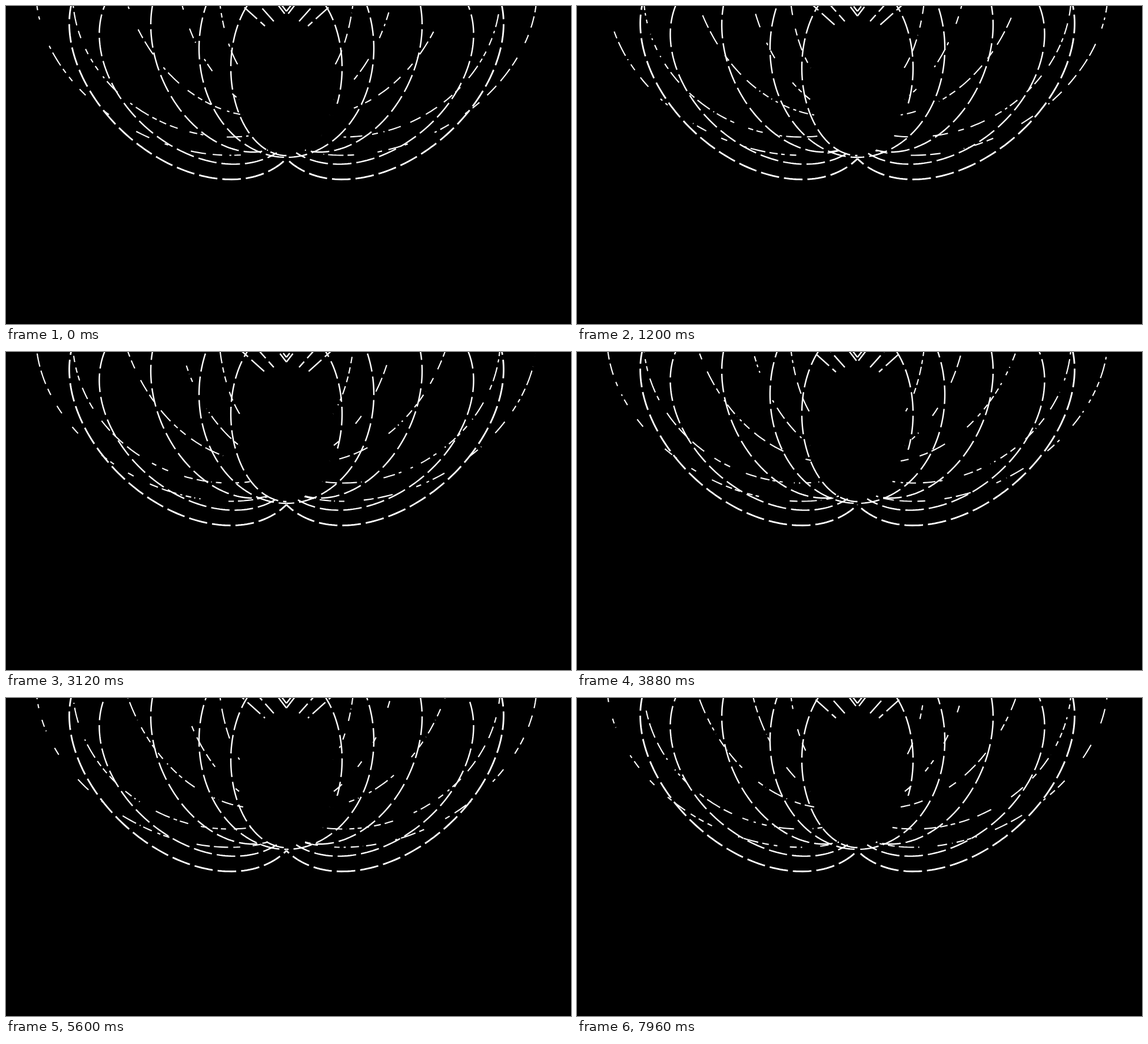
An HTML page with a canvas for the animation above (8 s loop, 960 px wide and 540 px high).

```html
<!DOCTYPE html>
<html>
<head>
<meta charset="utf-8">
<style>
html, body { margin: 0; width: 100%; height: 100%; overflow: hidden; background: #000; }
canvas { display: block; }
</style>
</head>
<body>
<canvas id="stage" width="960" height="540"></canvas>
<script>
const ctx = document.getElementById('stage').getContext('2d');
const LOOP = 8000, STEP = 40, CYCLE = 2000, AXIS = 476.5, DASH_SHARE = 0.79;

// Left part of a tilted ellipse, from the inner tip at tipX outward and up.
function arc(cx, cy, rx, ry, tilt, tipX) {
  const path = new Path2D(), from = Math.acos((cx - tipX) / rx), to = -0.9;
  for (let i = 0; i <= 120; i++) {
    const angle = from + (to - from) * i / 120;
    path.lineTo(cx - rx * Math.cos(angle), cy + ry * Math.sin(angle + tilt));
  }
  return path;
}

function ray(x, y, slope) {
  const path = new Path2D();
  path.moveTo(x, y);
  path.lineTo(x - 60, y - 60 * slope);
  return path;
}

function randomFrom(seed) {
  return () => (seed = seed * 16807 % 2147483647) / 2147483647;
}

// Uneven cover, alternating hidden and visible lengths.
function coverDashes(seed) {
  const random = randomFrom(seed);
  return Array.from({ length: 20 }, (_, i) =>
    i % 2 ? 8 + 48 * random() ** 1.3 : 5 + 48 * random() ** 2);
}

// start: distance from the tip at which a dash begins at time 0.
const petals = [
  { start: 6.4, path: arc(309, 100, 201.5, 194.5, -0.37, AXIS) },
  { start: 26, path: arc(335, 99, 176.5, 169.6, -0.305, 460) },
  { start: 10, path: arc(385, 75, 139, 173, -0.25, 445) },
  { start: 4, path: arc(AXIS, 72, 148.5, 185, 0, AXIS) },
  { start: -3.5, path: arc(AXIS, 105, 94.5, 149, 0, AXIS), leftOnlyBelow: 166 }
];
const tips = [
  { start: 18, path: ray(440, 34, 0.9) },
  { start: 0, path: ray(455, 26, 1.12) },
  { start: 5, path: ray(AXIS, 17, 1.3) },
  { start: -4, path: ray(AXIS, 9, 1.3) }
];
const veins = [
  arc(315, 31, 264, 222.5, -0.25, 446),
  arc(356, 2, 242.7, 220.5, -0.1, 417),
  arc(437, -140, 254, 328, 0, 403),
  arc(508, -100, 221, 300, 0, 396),
  arc(445, -60, 85, 200, 0, 397)
].map((path, i) => ({
  path,
  start: 24 + 8 * (i - 2),
  covers: [1, 2].map(side => coverDashes(7919 * (i + 2) + 104729 * side))
}));

function stroke(path, color, width, dashes, offset) {
  ctx.strokeStyle = color;
  ctx.lineWidth = width;
  ctx.setLineDash(dashes);
  ctx.lineDashOffset = offset;
  ctx.stroke(path);
}

// Dashes advance one period per cycle: outward for 1, inward for -1.
function dashed({ path, start }, time, direction, period, width) {
  const dash = period * DASH_SHARE;
  const shift = direction * period * time / CYCLE;
  stroke(path, '#fff', width, [dash, period - dash], -start - shift);
}

function drawHalf(side, time) {
  ctx.save();
  if (side) ctx.transform(-1, 0, 0, 1, 2 * AXIS, 0);
  for (const vein of veins) {
    dashed(vein, time, 1, 33, 2.1);
    stroke(vein.path, '#000', 4, vein.covers[side], -0.022 * time);
  }
  for (const tip of tips) dashed(tip, time, 1, 37, 2.4);
  petals.forEach((petal, i) => {
    ctx.save();
    if (side && petal.leftOnlyBelow) {
      ctx.beginPath();
      ctx.rect(0, 0, 960, petal.leftOnlyBelow);
      ctx.clip();
    }
    dashed(petal, time, -1, 40, i ? 2.4 : 2.8);
    ctx.restore();
  });
  ctx.restore();
}

function draw() {
  const time = Math.floor(performance.now() % LOOP / STEP) * STEP;
  ctx.fillStyle = '#000';
  ctx.fillRect(0, 0, 960, 540);
  drawHalf(0, time);
  drawHalf(1, time);
  requestAnimationFrame(draw);
}
draw();
</script>
</body>
</html>
```
